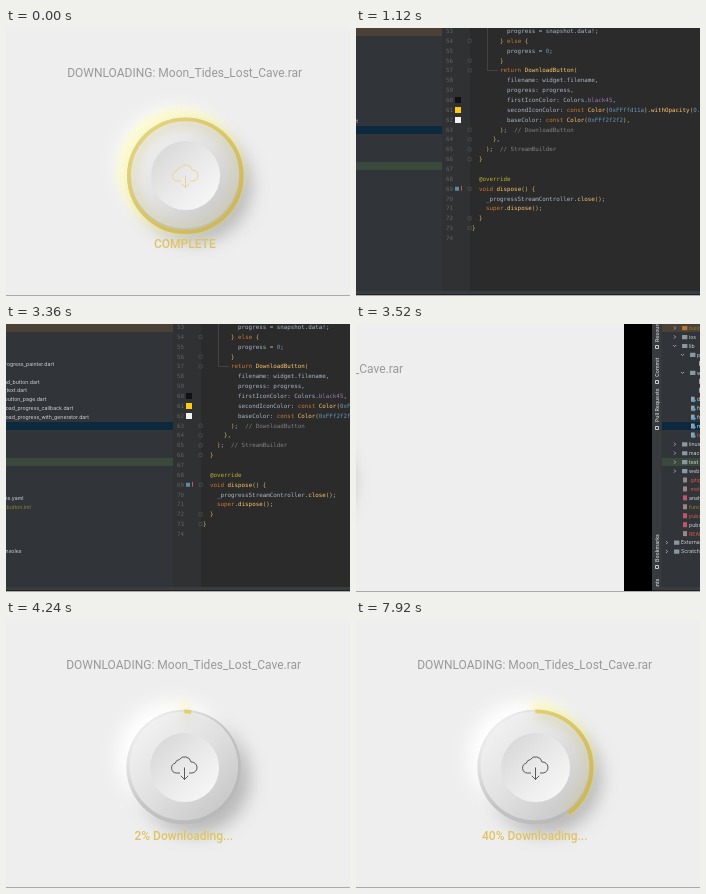
An HTML page for the animation above (8 s loop, 344x268 px).

```html
<!DOCTYPE html>
<html lang="en">
<head>
<meta charset="utf-8">
<title>Download button</title>
<style>
  html, body { margin: 0; width: 100%; height: 100%; overflow: hidden; background: #000; }
  svg { display: block; width: 100%; height: 100%; }
  text { white-space: pre; }
  .title, .status { font: 12px Roboto, sans-serif; fill: #999; }
  .status { font-weight: 500; text-anchor: middle; fill: #dfc462; }
  .tree { font: 5.2px Inter, sans-serif; fill: #d3d5d7; }
  .side { font-weight: 500; }
  .code { font: 5.83px "DejaVu Sans Mono", monospace; fill: #a9b7c6; }
  .line { fill: none; stroke: #555; stroke-width: .6; }
  .arc { fill: none; }
</style>
</head>
<body>
<svg viewBox="0 0 344 268" xmlns="http://www.w3.org/2000/svg">
  <defs>
    <linearGradient id="body" x1=".15" y1=".15" x2=".85" y2=".85">
      <stop offset="0" stop-color="#f0f0f0"/><stop offset=".5" stop-color="#e0e0e0"/><stop offset="1" stop-color="#cacaca"/>
    </linearGradient>
    <linearGradient id="rim" x1=".15" y1=".15" x2=".85" y2=".85">
      <stop offset="0" stop-color="#ececec"/><stop offset=".5" stop-color="#c4c4c4"/><stop offset="1" stop-color="#b8b8b8"/>
    </linearGradient>
    <linearGradient id="dish" x1=".15" y1=".15" x2=".85" y2=".85">
      <stop offset="0" stop-color="#dadada"/><stop offset=".5" stop-color="#e9e9e9"/><stop offset="1" stop-color="#f5f5f5"/>
    </linearGradient>
    <!-- The arcs are turned by -90deg, so this runs from top left to bottom right. -->
    <linearGradient id="gold" x1="1" y1="0" x2="0" y2="1">
      <stop offset="0" stop-color="#e6d980"/><stop offset="1" stop-color="#ccb24c"/>
    </linearGradient>
    <filter id="soft" x="-50%" y="-50%" width="200%" height="200%"><feGaussianBlur stdDeviation="9"/></filter>
    <filter id="glow" x="-50%" y="-50%" width="200%" height="200%"><feGaussianBlur stdDeviation="5"/></filter>
  </defs>
  <g id="world">
    <rect x="-160" width="677" height="268" fill="#eee"/>
    <text class="title" x="61.2" y="49">DOWNLOADING: Moon_Tides_Lost_Cave.rar</text>
    <circle cx="189" cy="158" r="56" fill="#adadad" opacity=".85" filter="url(#soft)"/>
    <circle cx="168" cy="137" r="56" fill="#fff" filter="url(#soft)"/>
    <circle class="arc" cx="175" cy="143.5" r="57" transform="rotate(-90 175 143.5)" filter="url(#glow)" pathLength="100" stroke="#fffa8c" stroke-width="8" opacity=".6"/>
    <circle cx="178.6" cy="147" r="57.3" fill="url(#rim)"/>
    <circle cx="178.8" cy="146" r="54.3" fill="url(#body)"/>
    <circle class="arc" cx="179.3" cy="147.7" r="52" transform="rotate(-90 179.3 147.7)" filter="url(#glow)" pathLength="100" stroke="#d3cf98" stroke-width="9" opacity=".45"/>
    <circle class="arc" cx="179.3" cy="147.7" r="56.3" transform="rotate(-90 179.3 147.7)" pathLength="100" stroke="url(#gold)" stroke-width="3.9"/>
    <circle cx="179.6" cy="147.6" r="34.5" fill="url(#dish)"/>
    <g id="icon" fill="none" stroke-width=".9" stroke-linejoin="round">
      <path d="M175 153H171.5A5 5 0 0 1 170.2 143.2A5 5 0 0 1 174.3 139.6A6.5 6.5 0 0 1 186 142A5.5 5.5 0 0 1 187 153H184"/>
      <path d="M179.5 147.5V159.5M175.8 155.8L179.5 159.5L183.2 155.8"/>
    </g>
    <text class="status" id="status" x="178.8" y="220"></text>
    <rect x="517" width="28" height="268"/>
    <g id="ide" transform="translate(545 0)"></g>
  </g>
  <rect y="267" width="344" height="1" fill="#aaa"/>
  <path id="caret" d="M24.5 263V267" stroke="#eee"/>
</svg>
<script>
const $ = id => document.getElementById(id);
const rect = (x, y, w, h, fill, rx = 0) =>
  `<rect x="${x}" y="${y}" width="${w}" height="${h}" fill="${fill}" rx="${rx}"/>`;
const text = (cls, x, y, content, fill, extra = '') =>
  `<text class="${cls}" x="${x}" y="${y}" ${fill ? `style="fill:${fill}"` : ''} ${extra}>${content}</text>`;
const path = (d, cls = 'line', extra = '') => `<path class="${cls}" d="${d}" ${extra}/>`;

const RED = '#dc5a40', OLIVE = '#93852f', BLUE = '#4ba3d6';
// depth, kind (open/closed folder, dart, other), name, colour
const tree = [
  [0, 'c', 'build', OLIVE], [0, 'c', 'ios'], [0, 'o', 'lib'], [1, 'o', 'painter'],
  [2, 'd', 'circle_progress_painter.dart'], [1, 'o', 'widgets'],
  [2, 'd', 'download_button.dart'], [2, 'd', 'loading_text.dart'],
  [1, 'd', 'download_button_page.dart'], [1, 'd', 'fake_download_progress_callback.dart'],
  [1, 'd', 'fake_download_progress_with_generator.dart'], [1, 'd', 'main.dart', '#e4e6e8'],
  [1, 'd', 'test.dart', RED], [0, 'c', 'linux'], [0, 'c', 'macos'], [0, 'c', 'test'], [0, 'c', 'web'],
  [0, 'f', '.gitignore', RED], [0, 'f', '.metadata', RED], [0, 'f', 'analysis_options.yaml'],
  [0, 'f', 'funcy_loading_button.iml', OLIVE], [0, 'f', 'pubspec.lock', RED],
  [0, 'f', 'pubspec.yaml'], [0, 'f', 'README.md', RED],
  [-1, 'c', 'External Libraries'], [-1, 'c', 'Scratches and Consoles']
];
const rowFill = { build: '#4a4035', 'main.dart': '#0d293e', test: '#3b493d' };

const treeRow = ([depth, kind, name, fill], i) => {
  const x = 37 + 8 * depth, y = 4 + 8.94 * i;
  const arrow = 'style="stroke:#bbb;stroke-width:.8"';
  let out = rowFill[name] ? rect(10, Math.round(y - 4.4), 230, 8, rowFill[name]) : '';
  if (kind === 'c') out += path(`M${x - 15} ${y - 1.6}l1.6 1.6l-1.6 1.6`, 'line', arrow);
  if (kind === 'o') out += path(`M${x - 16} ${y - .8}l1.6 1.6l1.6-1.6`, 'line', arrow);
  if (kind === 'd') {
    out += rect(x - 6, y - 2.8, 3.6, 5, '#9aa3a9') + path(`M${x - 5} ${y + 1}l2-2l2 2l-2 2z`, '', `fill="${BLUE}"`);
  } else if (kind === 'f') out += rect(x - 6, y - 2.5, 4, 5, /yaml|lock/.test(name) ? '#bd5868' : '#98868a');
  else out += rect(x - 7, y - 2, 5.4, 4.2, name === 'build' ? '#b07a35' : '#8b979f', .5);
  return out + text('tree', x, y + 1.9, name, fill);
};

// A leading number gives the indent in columns.
const code = [
  '10progress = snapshot.data!;', '8} else {', '10progress = 0;', '8}', '8return DownloadButton(',
  '10filename: widget.filename,', '10progress: progress,', '10firstIconColor: Colors.black45,',
  '10secondIconColor: const Color(0xFFffd11a).withOpacity(0.9),',
  '10baseColor: const Color(0xFFf2f2f2),', '8);  // DownloadButton', '6},',
  '4);  // StreamBuilder', '2}', '', '2@override', '2void dispose() {',
  '4_progressStreamController.close();', '4super.dispose();', '2}', '0}', ''
];
const tokens = [
  [/^\/\/.*/, '#808080'], [/^(else|return|const|void|super)\b/, '#cc7832'],
  [/^@\w+/, '#bbb529'], [/^(0x\w+|[\d.]+\d|\d)/, '#6897bb'],
  [/^(DownloadButton|Color|withOpacity|dispose|close)(?=\()/, '#ffc66d'],
  [/^black45/, '#9876aa'], [/^[(){}]/, '#d8b75b'], [/^(\w+|\W)/, '#a9b7c6']
];
const colour = source => {
  let out = '';
  while (source) {
    const [rule, fill] = tokens.find(([r]) => r.test(source));
    const word = source.match(rule)[0];
    out += `<tspan style="fill:${fill}">${word}</tspan>`;
    source = source.slice(word.length);
  }
  return out;
};
const lineY = i => 3 + 9.86 * i;
const codeRow = (row, i) => {
  const [, indent, body] = row.match(/^(\d*)(.*)$/);
  const y = lineY(i);
  let out = text('code', 244, y + 2, 53 + i, '#606366');
  if (body) out += text('code', 270 + 3.51 * indent, y + 2, colour(body));
  if (/^[})]|[({]$/.test(body)) out += path(`M266 ${y - 1.6}h3.2v3.2h-3.2z`);
  return out;
};
const sideLabel = (label, y) =>
  text('tree side', 0, 0, label, '', `transform="translate(6.8 ${y}) rotate(-90)"`);
const sideIcon = y => path(`M3.5 ${y - 1.5}h3v3h-3z`, 'line', 'style="stroke:#ccc;stroke-width:1"');

$('ide').innerHTML =
  rect(0, 0, 677, 268, '#2b2b2b') + rect(0, 0, 240, 268, '#313438') +
  rect(0, 0, 9.5, 268, '#383b3e') + rect(240, 0, 28, 268, '#2f3133') +
  tree.map(treeRow).join('') +
  sideLabel('Resource Manager', 18) + sideLabel('Commit', 53) + sideLabel('Pull Requests', 98) +
  sideLabel('Bookmarks', 238) + sideLabel('Variants', 275) +
  [23, 58, 104, 243].map(sideIcon).join('') +
  path(`M285.5 0V${lineY(4)}H296`) + code.map(codeRow).join('') +
  ['#111', '#fdc912', '#f2f2f2'].map((c, i) => rect(253, Math.round(lineY(7 + i) - 3), 6, 6, c)).join('') +
  rect(253, lineY(16) - 2, 4, 4, '#5b8ba5') + path(`M259.5 ${lineY(16) + 2}v-5`, 'line', 'style="stroke:#c75450;stroke-width:1"') +
  rect(0, 263, 677, 3, '#3a3d40') + rect(0, 266, 677, 2, '#202224');

const LOOP = 8000, STEP = 80, SPAN = 705;
const progressKeys = [[4080, 0], [4240, 2], [5920, 26], [7920, 40], [8000, 40]];

// Critically damped settle, from 0 to 1.
const settle = (time, start, tau) => {
  const u = Math.max(0, time - start) / tau;
  return 1 - (1 + u) * Math.exp(-u);
};
const progressAt = time => {
  if (time < 2000) return 100;
  const next = progressKeys.findIndex(([at]) => at > time);
  if (next < 1) return 0;
  const [t0, p0] = progressKeys[next - 1], [t1, p1] = progressKeys[next];
  return p0 + (p1 - p0) * (time - t0) / (t1 - t0);
};

function draw(time) {
  const shift = SPAN * (settle(time, 396, 105) - settle(time, 3299.5, 100));
  const progress = Math.floor(progressAt(time) + 1e-6), done = progress === 100;
  $('world').setAttribute('transform', `translate(${-Math.round(shift)} 0)`);
  for (const arc of document.querySelectorAll('.arc')) {
    arc.setAttribute('stroke-dasharray', done ? 'none' : `${progress} 200`);
    arc.style.visibility = progress ? 'visible' : 'hidden';
  }
  $('icon').setAttribute('stroke', done ? '#e6d384' : '#4a4a4a');
  $('status').textContent = done ? 'COMPLETE' : progress ? `${progress}% Downloading...` : '';
  $('caret').style.visibility = time >= 2160 && time < 3040 ? 'visible' : 'hidden';
}

const begin = performance.now();
function tick() {
  const time = (performance.now() - begin) % LOOP;
  draw(Math.floor(time / STEP) * STEP);
  requestAnimationFrame(tick);
}
tick();
</script>
</body>
</html>
```
